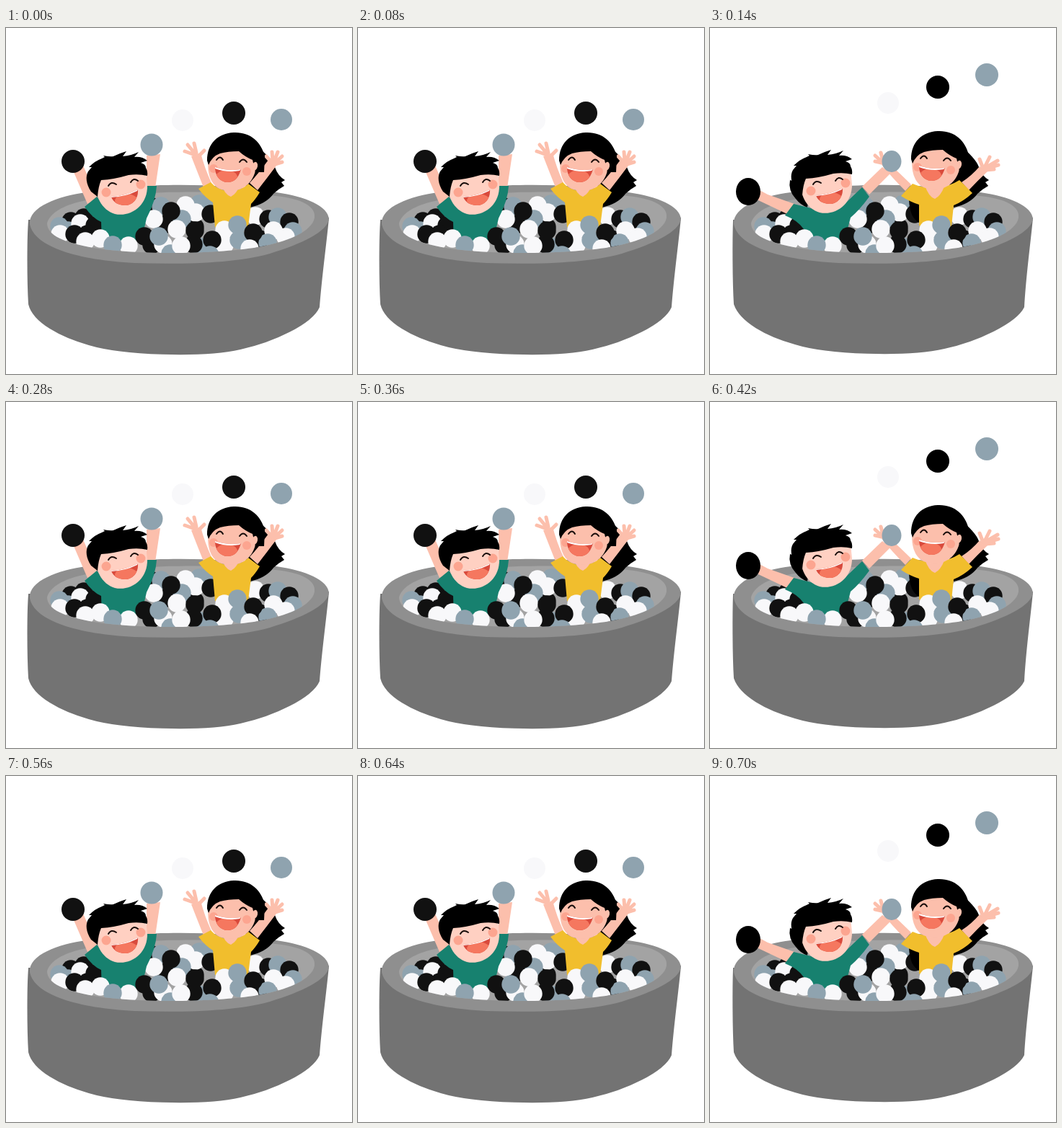
These frames come from a looping animation (480x480 px, 840 ms). An HTML page:

```html
<!DOCTYPE html>
<html lang="en">
<head>
<meta charset="utf-8">
<title>Ball pit</title>
<style>
  html, body { margin: 0; width: 100%; height: 100%; overflow: hidden; background: #fff; }
  svg { display: block; width: 100%; height: 100%; }
  .raised .low, .lowered .high { display: none; }
  .skin { fill: #fcbfac; }
  .pale { fill: #ffd0c2; }
  .blush { fill: #fca590; }
  .green { fill: #17816f; }
  .yellow { fill: #f1be2d; }
  .hair { fill: #000; }
  .black { fill: #111; }
  .white { fill: #f8f8fa; }
  .grey { fill: #8fa3af; }
  .tub { fill: #737373; stroke: #737373; stroke-width: 2; }
  .line { fill: none; stroke: #190d0b; stroke-width: 2; stroke-linecap: round; }
  .fingers { fill: none; stroke: #fcbfac; stroke-width: 5; stroke-linecap: round; }
</style>
</head>
<body>
<svg id="scene" class="raised" viewBox="0 0 480 480">
  <defs>
    <path id="inside" d="M57 271C62 252 92 241 125 237C185 225 310 225 383 234C416 239 430 250 428 263C425 283 388 297 350 304C288 314 180 315 122 305C82 298 57 288 57 271Z"/>
    <clipPath id="hole"><use href="#inside"/></clipPath>
    <path id="boyGrin" d="M146 234Q166 233 183 224C184 238 175 246 165 246C155 246 148 241 146 234Z"/>
    <clipPath id="boyMouth"><use href="#boyGrin"/></clipPath>
    <path id="girlGrin" d="M290 193Q308 199 326 196C322 210 315 215 305 214C296 212 290 205 290 193Z"/>
    <clipPath id="girlMouth"><use href="#girlGrin"/></clipPath>

    <g id="boyHead">
      <path class="pale" d="M125 211C123 233 132 252 151 258C173 263 197 246 196 218L194 200L145 199Z"/>
      <path class="hair" d="M118 227C111 216 110 206 114 199L119 193L115 193Q124 184 133 181L137 179L135 177Q145 179 149 178Q157 174 167 171L162 178Q174 177 184 172L178 179Q189 178 196 184L187 187Q194 189 194 194Q197 199 196 205Q184 202 170 204Q150 210 132 211Q128 220 127 234Z"/>
      <circle class="blush" cx="139" cy="228" r="6.5"/>
      <circle class="blush" cx="187" cy="217" r="6.5"/>
      <path class="line" d="M142 219Q146 212 153 217M173 214Q177 207 183 212"/>
      <use href="#boyGrin" fill="#d94a3c"/>
      <g clip-path="url(#boyMouth)">
        <ellipse cx="167" cy="240" rx="16" ry="10" fill="#f5775f"/>
        <path d="M145 232L184 222L182 226Q166 234 146 235Z" fill="#fff"/>
      </g>
    </g>

    <g id="girlHead">
      <path class="skin" d="M281 180C278 198 283 219 299 224C324 231 345 217 347 191L345 173L295 164Z"/>
      <path class="hair" d="M279 184C279 160 294 146 316 145C339 144 354 158 359 178L358 200L346 200L342 183Q332 179 323 171Q308 171 297 174Q286 178 281 190Z"/>
      <path class="skin" d="M341 190Q347 182 349 189Q350 196 343 199Z"/>
      <circle class="blush" cx="288" cy="195" r="6"/>
      <circle class="blush" cx="334" cy="199" r="6"/>
      <path class="line" d="M292 183Q297 176 301 183M324 186Q329 179 334 186"/>
      <use href="#girlGrin" fill="#d94a3c"/>
      <g clip-path="url(#girlMouth)">
        <ellipse cx="306" cy="207" rx="15" ry="10" fill="#f5775f"/>
        <path d="M289 192L327 195L324 198Q306 201 290 195Z" fill="#fff"/>
      </g>
    </g>

    <path id="backHair" class="hair" d="M346 162Q369 181 373 193Q377 205 387 211L382 214L386 219Q377 224 371 230Q361 244 338 249L330 205Z"/>
    <path id="neck" class="skin" d="M298 218L325 220Q320 233 312 237Q303 234 298 218Z"/>
  </defs>

  <!-- tub -->
  <path class="high tub" d="M32 267C30 292 30 350 32 383C38 408 76 428 115 439C162 453 270 457 325 445C371 435 424 410 434 387C437 346 443 305 447 264Z"/>
  <path class="low tub" d="M33 267C32 292 32 350 34 383C42 407 78 427 118 438C163 452 270 456 325 444C371 434 424 409 435 387C437 346 443 305 447 264Z"/>
  <path fill="#8f8f8f" d="M33 272C31 248 73 233 112 228C180 215 295 214 375 228C416 234 447 247 448 265C445 283 411 299 366 313C315 327 245 328 178 326C101 322 39 304 33 272Z"/>
  <use href="#inside" fill="#a3a3a3"/>

  <g id="backBalls" clip-path="url(#hole)"></g>

  <!-- girl, arms up -->
  <g class="high">
    <use href="#backHair"/>
    <path class="skin" d="M257 178L270 173Q275 193 285 215L274 221Q266 201 257 178ZM364 183L375 191Q363 207 349 225L338 215Q350 202 364 183Z"/>
    <path class="fingers" d="M262 176L248 171M262 174L252 162M264 173L261 160M268 177L275 170M369 187L361 178M370 184L369 172M372 185L377 172M373 187L383 178M373 189L383 186"/>
    <path class="yellow" d="M267 223L284 214Q292 224 310 227Q328 225 336 216L352 228Q346 238 340 244L336 275L310 282L290 276L287 242Q276 235 267 223Z"/>
    <use href="#neck" y="-3"/>
    <use href="#girlHead"/>
  </g>

  <!-- girl, arms out -->
  <g class="low">
    <use href="#backHair"/>
    <path class="hair" d="M276 238L291 244L290 270Q277 263 276 238Z"/>
    <path class="skin" d="M237 188L248 188Q264 202 279 217L271 226Q251 206 237 188ZM374 192L385 199Q371 212 359 225L349 214Q363 205 374 192Z"/>
    <path class="fingers" d="M238 187L229 185M239 186L229 177M240 184L237 173M379 195L374 182M381 193L388 179M382 194L399 184M383 195L400 190M382 197L394 196"/>
    <path class="yellow" d="M265 233L281 216Q294 222 313 222Q332 220 346 211L364 229Q351 241 338 246L335 275L310 282L290 274L290 245Q277 241 265 233Z"/>
    <use href="#neck"/>
    <use href="#girlHead" y="-2"/>
  </g>

  <!-- boy, arms up -->
  <g class="high">
    <path class="skin" d="M94 200L107 191L127 236L113 244ZM195 177L214 175L207 222L195 222Z"/>
    <path class="green" d="M109 248L126 234Q139 253 162 258Q187 254 196 219L209 219Q208 239 195 264L188 294L133 299L132 269Q120 264 109 248Z"/>
    <use href="#boyHead"/>
    <circle class="black" cx="93" cy="185" r="16"/>
    <circle class="grey" cx="202" cy="162" r="15.5"/>
  </g>

  <!-- boy, arms out -->
  <g class="low">
    <path class="hair" d="M111 211Q108 225 119 237Q125 245 135 249L139 220Z"/>
    <path class="skin" d="M67 224L80 231L117 244L107 258L67 239ZM211 220L239 193L251 201L221 231Z"/>
    <path class="green" d="M104 260L116 244L140 250Q170 265 190 241L211 221L221 234Q207 253 195 263L187 294L137 297L130 279Q122 267 104 260Z"/>
    <use href="#boyHead" x="1" y="-2"/>
    <ellipse class="hair" cx="53" cy="227" rx="17" ry="19"/>
    <ellipse class="grey" cx="252" cy="185" rx="13.5" ry="15"/>
  </g>

  <g id="frontBalls" clip-path="url(#hole)"></g>

  <!-- thrown balls -->
  <g class="high">
    <circle class="white" cx="245" cy="128" r="15"/>
    <circle class="black" cx="316" cy="118" r="16"/>
    <circle class="grey" cx="382" cy="127" r="15"/>
  </g>
  <g class="low">
    <circle class="white" cx="247" cy="104" r="15"/>
    <circle class="hair" cx="316" cy="82" r="16"/>
    <circle class="grey" cx="384" cy="65" r="16"/>
  </g>
</svg>
<script>
const scene = document.getElementById("scene");
const POSE_MS = 140;
const BALL_RADIUS = 12.7;
const colours = { k: "black", w: "white", g: "grey" };

// Each ball is a colour letter followed by its centre, listed back to front.
function addBalls(id, spec) {
  document.getElementById(id).innerHTML = spec.trim().split(/\s+/).map(ball => {
    const [x, y] = ball.slice(1).split(",");
    return `<circle class="${colours[ball[0]]}" cx="${x}" cy="${y}" r="${BALL_RADIUS}"/>`;
  }).join("");
}

addBalls("backBalls", `
  k90,268 k108,263 k203,248 g268,244 k222,272 k262,276 g74,275 g86,281
  w103,271 k123,274 g215,247 g281,243 w249,246 w263,256 w205,265 g244,265
  k229,254 k284,258 w346,261 k364,265 g377,262 k393,269`);

addBalls("frontBalls", `
  k113,286 k202,301 g270,304 k352,293 w75,286 k95,286 w110,296
  w131,292 w170,302 g148,301 w237,279 k262,281 w303,280 g321,273 w371,281
  g398,282 w388,290 g363,298 w218,300 k192,289 g212,289 g228,313
  k260,300 w243,302 w303,301 k286,294 g323,294 k343,284 w338,306 g283,315`);

function draw(now) {
  const raised = Math.floor(now / POSE_MS) % 2 === 0;
  scene.setAttribute("class", raised ? "raised" : "lowered");
  requestAnimationFrame(draw);
}
requestAnimationFrame(draw);
</script>
</body>
</html>
```
